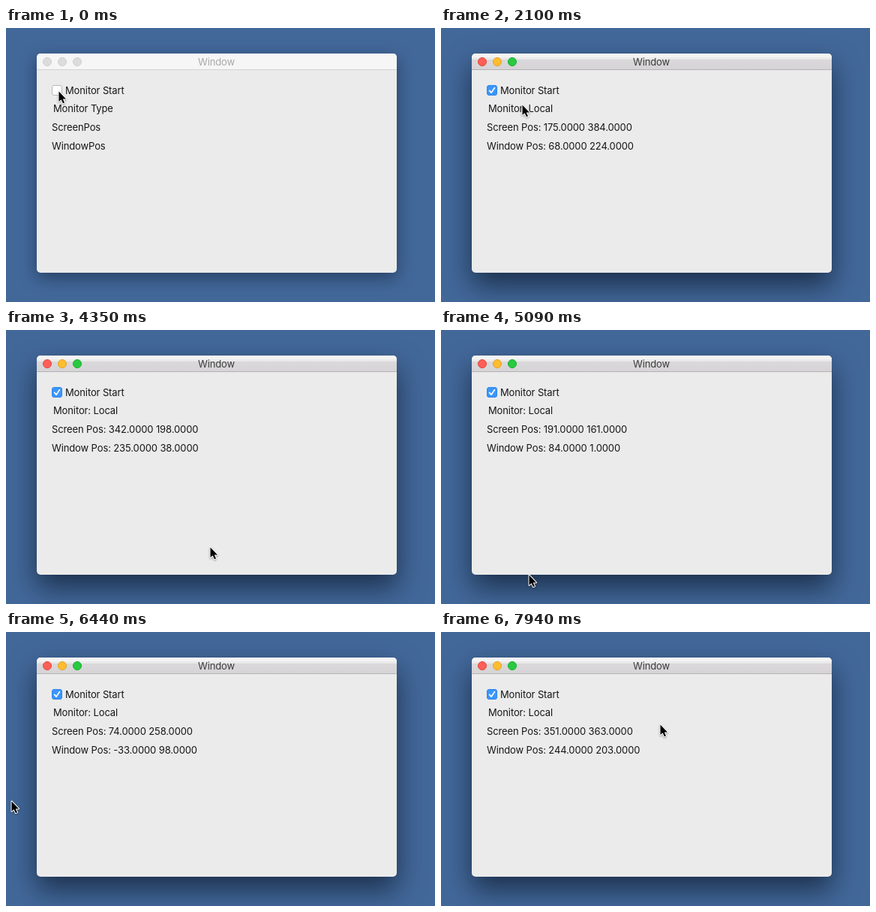
Animation of 572 by 365 pixels, one loop 8 s. Source, as an HTML page:

```html
<!DOCTYPE html>
<html lang="en">
<head>
<meta charset="utf-8">
<title>Mouse monitor</title>
<style>
html, body { margin: 0; width: 100%; height: 100%; overflow: hidden; }
body { position: relative; background: #42689a; font: 13px/16px Inter, "Open Sans", sans-serif; letter-spacing: -0.12px; color: #161616; }
#win { position: absolute; left: 41px; top: 34px; width: 480px; height: 292px; border-radius: 5px; background: #ebebeb; box-shadow: 0 7px 22px rgba(0,10,25,.42); }
#bar { position: absolute; left: 0; top: 0; width: 480px; height: 21px; border-radius: 5px 5px 0 0; background: #f6f6f6; border-bottom: 1px solid #d2d2d2; }
#title { position: absolute; left: 0; top: 3px; width: 479px; text-align: center; color: #a8a8a8; }
.dot { position: absolute; top: 5px; width: 12px; height: 12px; box-sizing: border-box; border-radius: 50%; background: #dcdcdc; border: 1px solid #cfcfcf; }
.label { position: absolute; white-space: pre; }
#box { position: absolute; left: 20px; top: 42px; width: 14px; height: 14px; box-sizing: border-box; border-radius: 3px; background: #fff; border: 1px solid #b9b9b9; }
#box.down { background: #dedede; border-color: #a6a6a6; }
#box.on { background: #3b96fb; border-color: #2f88ee; }
#tick { position: absolute; left: -1px; top: -1px; opacity: 0; }
.on #tick { opacity: 1; }
.active#win { box-shadow: 0 17px 36px rgba(0,8,20,.58), 0 0 1px rgba(0,0,0,.3); }
.active #bar { background: linear-gradient(#f4f4f4 5px, #ebebeb 5px, #e9e9e9 8px, #dad8da 8px, #d6d4d6); border-color: #b4b2b4; }
.active #title { color: #3c3c3c; }
.active .red { background: #fe5f57; border-color: #e5453f; }
.active .yellow { background: #febd2f; border-color: #e2a327; }
.active .green { background: #28ca41; border-color: #1bac2d; }
#pointer { position: absolute; left: 0; top: 0; overflow: visible; }
#arrow { filter: drop-shadow(0 1px 1px rgba(0,0,0,.35)); }
.ink { fill: #000; stroke: #fff; stroke-width: 2; stroke-linejoin: round; paint-order: stroke; }
</style>
</head>
<body>
<div id="win">
  <div id="bar"></div>
  <div class="dot red" style="left:8px"></div>
  <div class="dot yellow" style="left:28px"></div>
  <div class="dot green" style="left:48px"></div>
  <div id="title">Window</div>
  <div id="box"><svg id="tick" width="14" height="14"><path d="M3.6 7.4L6 10.2L10.4 3.8" fill="none" stroke="#fff" stroke-width="1.7" stroke-linecap="round" stroke-linejoin="round"/></svg></div>
  <div class="label" style="left:38px;top:41px">Monitor Start</div>
  <div class="label" id="kind" style="left:22px;top:65px"></div>
  <div class="label" id="screenPos" style="left:20px;top:90px"></div>
  <div class="label" id="windowPos" style="left:20px;top:115px"></div>
</div>
<svg id="pointer" width="1" height="1">
  <path id="arrow" class="ink" d="M0.5 0.5V14L3.6 11.2L5.9 16.3L8 15.4L5.8 10.4H10Z"/>
  <path id="resize" class="ink" d="M5.8 -5.8V-.8L4 -2.6L-2.6 4L-.8 5.8H-5.8V.8L-4 2.6L2.6 -4L.8 -5.8Z"/>
</svg>
<script>
const LOOP = 8000, STEP = 150, LATE = 4940, LAG = 30;
const $ = id => document.getElementById(id);

// Mouse path: time, x, y
const path = [
  [1650, 70, 84], [1800, 76, 87], [1950, 97, 95], [2100, 108, 102], [2130, 108, 102],
  [2400, 110, 142], [2700, 101, 194], [2850, 107, 218], [3150, 138, 250],
  [3300, 157, 246], [3330, 157, 246], [3600, 230, 216], [3750, 261, 203],
  [3900, 296, 205], [4050, 322, 230], [4200, 306, 266], [4350, 275, 288], [4380, 272, 289],
  [4650, 215, 317], [4800, 187, 321], [4940, 160, 320], [5240, 88, 330],
  [5390, 54, 338], [5540, 28, 336], [5690, 33, 331], [5840, 39, 328], [5870, 39, 330],
  [5990, 29, 317], [6140, 14, 280], [6440, 7, 228], [6590, 8, 214], [6800, 8, 214],
  [7040, 2, 140], [7190, 5, 113], [7220, 6, 112], [7340, 30, 114], [7490, 98, 122],
  [7640, 172, 128], [7790, 240, 127], [7940, 284, 123], [7970, 292, 123]
];

function mouseAt(t) {
  let i = path.findIndex(p => p[0] >= t);
  if (i < 0) i = path.length - 1;
  if (i === 0) return path[0].slice(1);
  const a = path[i - 1], b = path[i];
  const k = Math.min(1, (t - a[0]) / (b[0] - a[0]));
  return [1, 2].map(n => Math.round(a[n] + (b[n] - a[n]) * k));
}

function tickTime(t) {
  const start = t < LATE ? 0 : LATE;
  return start + Math.floor((t - start) / STEP) * STEP;
}

const pair = (x, y) => x.toFixed(4) + " " + y.toFixed(4);

function setText(id, text) {
  const el = $(id);
  if (el.textContent !== text) el.textContent = text;
}

function draw(t) {
  $("win").className = t >= 600 ? "active" : "";
  $("box").className = t >= 900 ? "on" : t >= 750 ? "down" : "";
  $("box").style.opacity = t >= 900 && t < 1050 ? 0.8 : 1;

  const moved = t >= 1800;
  const [mx, my] = mouseAt(t);
  const wx = mx - 40, wy = 326 - my;
  setText("kind", moved ? "Monitor: Local" : "Monitor Type");
  setText("screenPos", moved ? "Screen Pos: " + pair(wx + 107, wy + 160) : "ScreenPos");
  setText("windowPos", moved ? "Window Pos: " + pair(wx, wy) : "WindowPos");

  const [x, y] = mouseAt(t + LAG);
  const corner = Math.abs(x - 40) < 5 && Math.abs(y - 328) < 5;
  $("pointer").style.transform = `translate(${x}px, ${y}px)`;
  $("arrow").style.display = corner ? "none" : "";
  $("resize").style.display = corner ? "" : "none";
}

const begin = performance.now();
function frame(now) {
  draw(tickTime(Math.max(0, now - begin) % LOOP));
  requestAnimationFrame(frame);
}
draw(0);
requestAnimationFrame(frame);
</script>
</body>
</html>
```
